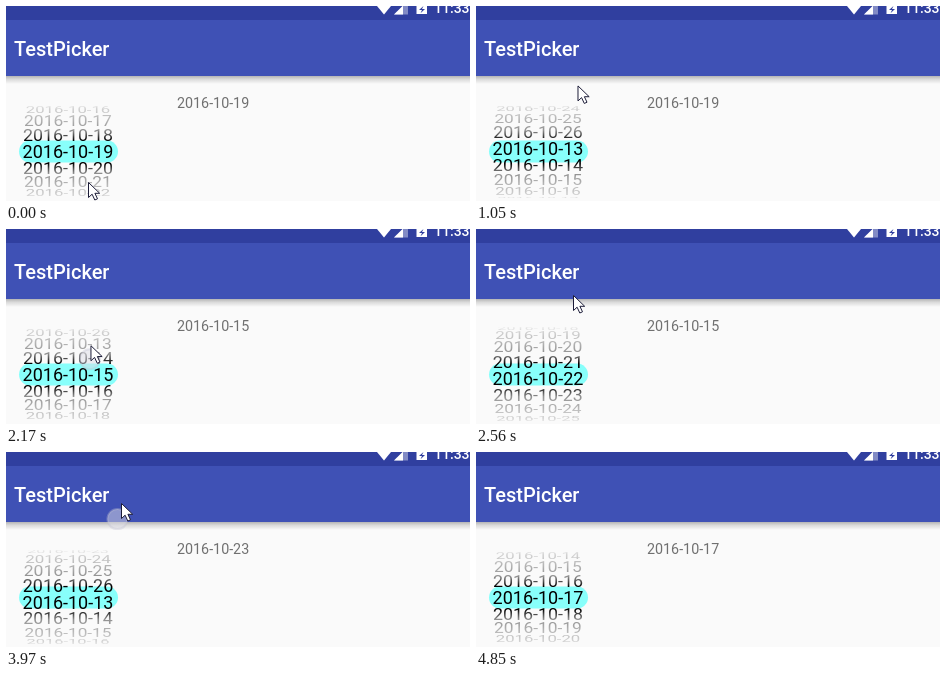
An HTML page for the animation above (5410 ms loop, 464 by 195 pixels).

```html
<!DOCTYPE html>
<html lang="en">
<head>
<meta charset="utf-8">
<title>TestPicker</title>
<style>
html, body { margin: 0; width: 100%; height: 100%; overflow: hidden; background: #fafafa; }
svg { display: block; width: 100vw; height: 100vh; font-family: Roboto, sans-serif; }
</style>
</head>
<body>
<svg viewBox="0 0 464 195">
  <defs>
    <linearGradient id="shadow" x2="0" y2="1">
      <stop stop-opacity=".28"/>
      <stop offset=".4" stop-opacity=".13"/>
      <stop offset="1" stop-opacity="0"/>
    </linearGradient>
    <!-- Reflected, so rows fade the same way above and below the middle -->
    <linearGradient id="fade" gradientUnits="userSpaceOnUse" x1="0" x2="0" y1="146" y2="194" spreadMethod="reflect">
      <stop offset=".24" stop-color="#fff"/>
      <stop offset=".34" stop-color="#fff" stop-opacity=".7"/>
      <stop offset=".45" stop-color="#fff" stop-opacity=".42"/>
      <stop offset=".65" stop-color="#fff" stop-opacity=".29"/>
      <stop offset=".9" stop-color="#fff" stop-opacity=".16"/>
      <stop offset="1" stop-color="#fff" stop-opacity=".05"/>
    </linearGradient>
    <mask id="rim" maskUnits="userSpaceOnUse" x="0" y="98" width="130" height="94">
      <rect y="98" width="130" height="94" fill="url(#fade)"/>
    </mask>
  </defs>

  <rect width="464" height="195" fill="#fafafa"/>
  <rect y="70" width="464" height="8" fill="url(#shadow)"/>
  <rect width="464" height="70" fill="#3f51b5"/>
  <rect width="464" height="14" fill="#303f9f"/>
  <g fill="#fff">
    <path d="M371 0H385L378 8.6Z"/>
    <path d="M388 8.6L402-5.4V8.6Z" opacity=".4"/>
    <path d="M388 8.6L397-.4V8.6Z"/>
    <path d="M410.5 0H421V8H410.5Z"/>
    <path d="M417.5 0L413 4H416L414.5 7.2L419 3H416Z" fill="#303f9f"/>
    <text x="428" y="7.3" font-size="14" font-weight="500">11:33</text>
    <text x="8" y="50" font-size="20" font-weight="500">TestPicker</text>
  </g>
  <text id="label" x="171" y="101.5" font-size="14.3" fill="#707070"></text>

  <rect x="13" y="134.5" width="99" height="22" rx="11" fill="#88fffb"/>
  <g id="wheel" mask="url(#rim)" font-size="18" text-anchor="middle"></g>

  <circle id="touch" r="10" fill="#dcdce6" fill-opacity=".5" stroke="#c0c0d0" stroke-opacity=".35" stroke-width="2"/>
  <path id="cursor" d="M-.5-.5V14.5L3.1 11.2L5.8 17L8.5 15.8L5.9 10.3H10.7Z" fill="#fff" stroke="#1c1c38"/>
</svg>
<script>
const LOOP = 5410, TICK = 126, HOLD = 265, LAG = 32;
const RADIUS = 48, TURN = Math.PI / 9, FIRST_DAY = 19;
const $ = id => document.getElementById(id);

// Each swipe: finger down, how far and how long the wheel turns, when the label follows
const swipes = [
  { press: 390, days: 10, spin: 916, settled: 1590 },
  { press: 2170, days: 8, spin: 536, settled: 3070 },
  { press: 3716, days: 8, spin: 525, settled: 4850 }
];

// Turning points of the pointer: time, x, y
const pointer = [[264, 83, 177], [642, 96, -15], [1050, 103, 88], [1524, 88, 161], [2040, 79, 170],
  [2422, 98, 15], [2548, 98, 67], [3304, 97, 157], [3716, 80, 171], [3968, 116, 52], [4094, 165, 110]];

const ease = u => u ** 3 * (u * (6 * u - 15) + 10);
const clamp = u => Math.min(1, Math.max(0, u));

// Days after FIRST_DAY, with each swipe weighted by its progress
const day = progress => swipes.reduce((sum, s) => sum + s.days * progress(s), FIRST_DAY);

// Days run from 13 to 26 and wrap around
const date = n => "2016-10-" + (13 + (n - 13) % 14);

function pointerAt(t) {
  const i = pointer.findIndex(k => k[0] > t);
  if (i < 1) return pointer.at(i).slice(1);
  const [t0, x0, y0] = pointer[i - 1], [t1, x1, y1] = pointer[i], f = (t - t0) / (t1 - t0);
  return [x0 + (x1 - x0) * f, y0 + (y1 - y0) * f];
}

function place(el, point) {
  el.style.display = point ? "" : "none";
  if (point) el.setAttribute("transform", `translate(${point})`);
}

const rows = Array.from({ length: 9 }, () => {
  const row = document.createElementNS("http://www.w3.org/2000/svg", "text");
  row.setAttribute("y", 6.4);
  return $("wheel").appendChild(row);
});

function draw(now) {
  // The picture is refreshed in steps counted from the current swipe
  const { press } = swipes.findLast(s => s.press - 2 * TICK <= now) ?? swipes[0];
  const t = press + Math.floor((now - press) / TICK) * TICK;

  const pos = day(s => ease(clamp((t - s.press) / s.spin)));
  rows.forEach((row, i) => {
    const n = Math.round(pos) + i - 4, angle = (n - pos) * TURN, depth = Math.cos(angle);
    row.textContent = depth > 0.2 ? date(n) : "";
    row.setAttribute("transform",
      `translate(62 ${145.7 + RADIUS * Math.sin(angle)}) scale(${0.86 + 0.14 * depth} ${depth})`);
  });
  $("label").textContent = date(day(s => now >= s.settled));
  place($("cursor"), t < 4200 && pointerAt(t));
  place($("touch"), t >= press && t < press + HOLD && pointerAt(t - LAG));
}

function frame() {
  draw(performance.now() % LOOP);
  requestAnimationFrame(frame);
}
frame();
</script>
</body>
</html>
```
